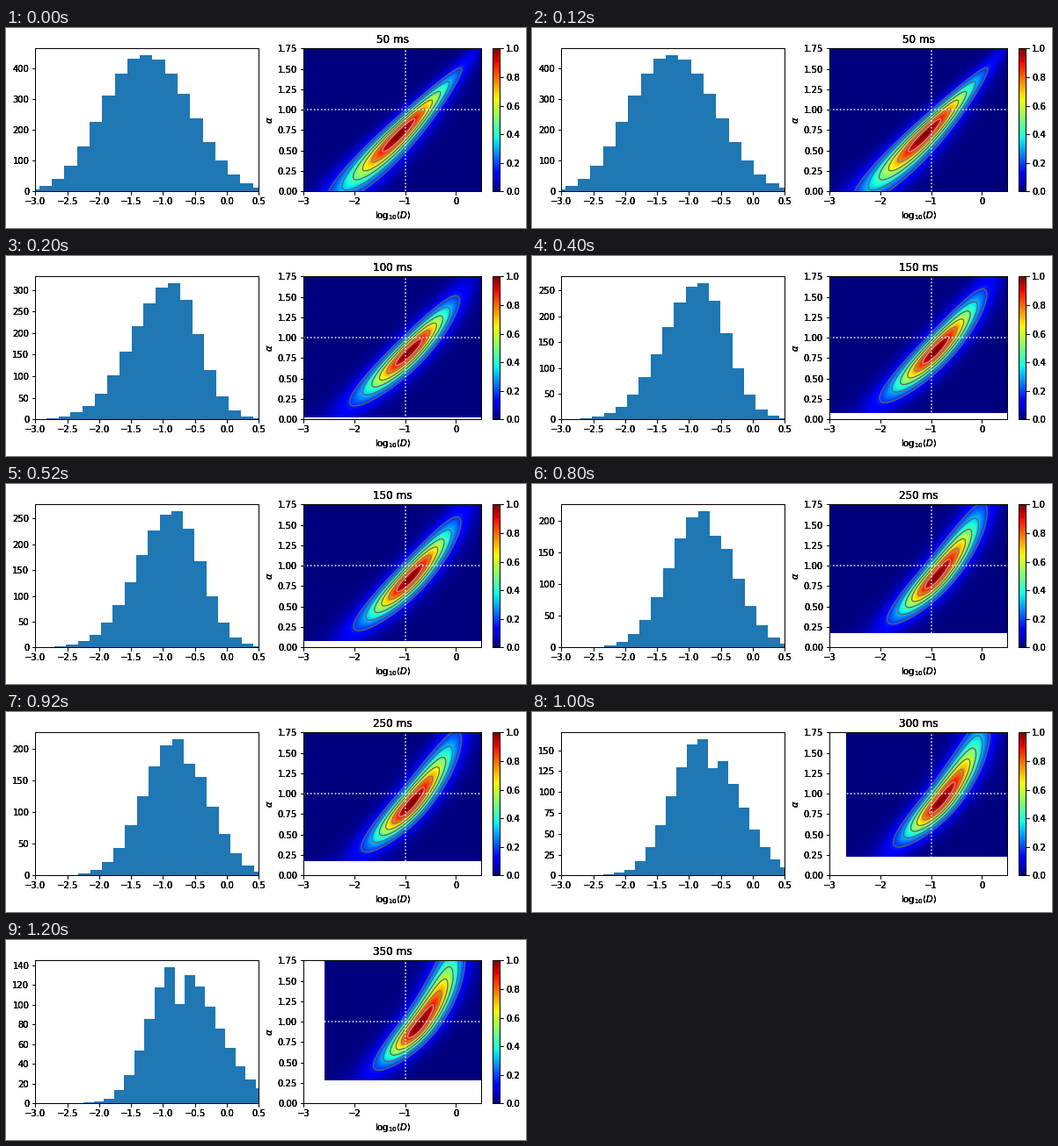
Animation, 591 px wide and 228 px high, one loop 1.4 s. Source, as a matplotlib script:

```python
import numpy as np
import matplotlib.pyplot as plt
from matplotlib.animation import FuncAnimation

WIDTH, HEIGHT, DPI = 591, 228, 72
TOP, BOTTOM = 23.4, 186.3
XLIM, ALPHA_LIM = (-3, 0.5), (0, 1.75)
LEVELS = np.arange(0.17, 1, 0.145)
GREYS = [str(0.38 + 0.5 * level**6) for level in LEVELS]

LAGS = np.arange(50, 351, 50)
PEAK_COUNTS = (441, 315, 264, 243, 215, 163, 138)
BIN_WIDTHS = (0.197, 0.1905, 0.183, 0.186, 0.183, 0.163, 0.1585)
KEY_LAGS = (50, 100, 250, 350)

plt.rcParams["font.family"] = "DejaVu Sans"
plt.rcParams["font.size"] = 10

fig = plt.figure(figsize=(WIDTH / DPI, HEIGHT / DPI), dpi=DPI)


def panel(left, right, xlim, ylim, title="", xlabel="", ylabel="", bar=False):
    """Stack equal axes so that text gets firm edges; return the lowest."""
    rect = (left / WIDTH, 1 - BOTTOM / HEIGHT,
            (right - left) / WIDTH, (BOTTOM - TOP) / HEIGHT)
    layers = [fig.add_axes(rect, facecolor="none") for _ in range(4)]
    for ax in layers:
        ax.set(xlim=xlim, ylim=ylim, title=title, xlabel=xlabel, ylabel=ylabel)
        if bar:
            ax.set_xticks([])
            ax.yaxis.tick_right()
    return layers[0]


def between(lag, *values):
    return np.interp(lag, KEY_LAGS, values)


def histogram(x, lag):
    """Two-sided bell that narrows on the left and splits at long lags."""
    early, late = (50 / lag)**3, lag / 350
    d = x + 0.8 + 0.48 * early
    left = 0.98 - 0.4 * late
    right = 0.51 + 0.37 * late**2 + 0.48 * early
    bell = np.exp(-np.abs(d / np.where(d < 0, left, right))**(2 + 0.2 * early))
    dip_depth = max(0, 0.3 * (lag - 200) / 150)
    dip_place = -0.58 - 0.0014 * (lag - 250)
    return bell * (1 - dip_depth * np.exp(-((x - dip_place) / 0.09)**2))


def density(x, y, lag):
    """Bell along a slightly bent ridge, on top of a faint wider haze."""
    x0 = between(lag, -1.12, -0.93, -0.91, -0.76)
    t = y - between(lag, 0.69, 0.82, 0.86, 0.93)
    slope = between(lag, 1.50, 1.48, 1.30, 1.20)
    bend = between(lag, -0.05, -0.22, -0.32, -0.48)
    below = between(lag, 0.42, 0.325, 0.285, 0.26)
    above = between(lag, 0.41, 0.345, 0.45, 0.57)
    narrowing = between(lag, 0.10, 0.05, 0.03, 0.02)

    along = t / np.where(t < 0, below, above)
    across = (x - x0 - slope * t - bend * t**2) / (0.21 - narrowing * t)
    r2 = along**2 + across**2
    return 0.9 * np.exp(-r2 / 2) + 0.1 * np.exp(-r2 / 6)


def draw_histogram(lag, peak, width):
    ax = panel(33.3, 287.3, XLIM, (0, 1.05 * peak))
    last_edge = 0.41 + 0.04 * (lag / 350)**4
    edges = last_edge + width * np.arange(-18, 2)
    shape = histogram(edges + width / 2, lag)
    ax.bar(edges, np.round(peak * shape / shape.max()), width, align="edge")
    ax.set_xlim(XLIM)


def draw_density(lag):
    ax = panel(338, 540.4, XLIM, ALPHA_LIM, f"{lag} ms",
               r"$\mathrm{log}_{10}\langle D\rangle$", r"$\alpha$")
    left = XLIM[0] if lag < 300 else -2.68 + 0.002 * (lag - 300)
    low = max(0, 0.00102 * (lag - 75))
    x, y = np.meshgrid(np.linspace(left, XLIM[1], 240),
                       np.linspace(low, ALPHA_LIM[1], 240))
    z = density(x, y, lag)
    ax.imshow(z, cmap="jet", vmin=0, vmax=1, origin="lower", aspect="auto",
              extent=(left, XLIM[1], low, ALPHA_LIM[1]))
    ax.contour(x, y, z, LEVELS, colors=GREYS, linewidths=1.3)
    ax.axvline(-1, color="white", ls=":", lw=1.5)
    ax.axhline(1, color="white", ls=":", lw=1.5)
    ax.set(xlim=XLIM, ylim=ALPHA_LIM)


def draw_scale():
    ax = panel(553, 561.1, (0, 1), (0, 1), bar=True)
    ax.imshow(np.linspace(0, 1, 256)[:, None], cmap="jet", origin="lower",
              aspect="auto", extent=(0, 1, 0, 1))
    ax.set_xticks([])


def draw(index):
    fig.clf()
    lag = LAGS[index]
    draw_histogram(lag, PEAK_COUNTS[index], BIN_WIDTHS[index])
    draw_density(lag)
    draw_scale()
    return []


animation = FuncAnimation(fig, draw, frames=len(LAGS), interval=200,
                          repeat=True, repeat_delay=0)
plt.show()
```
